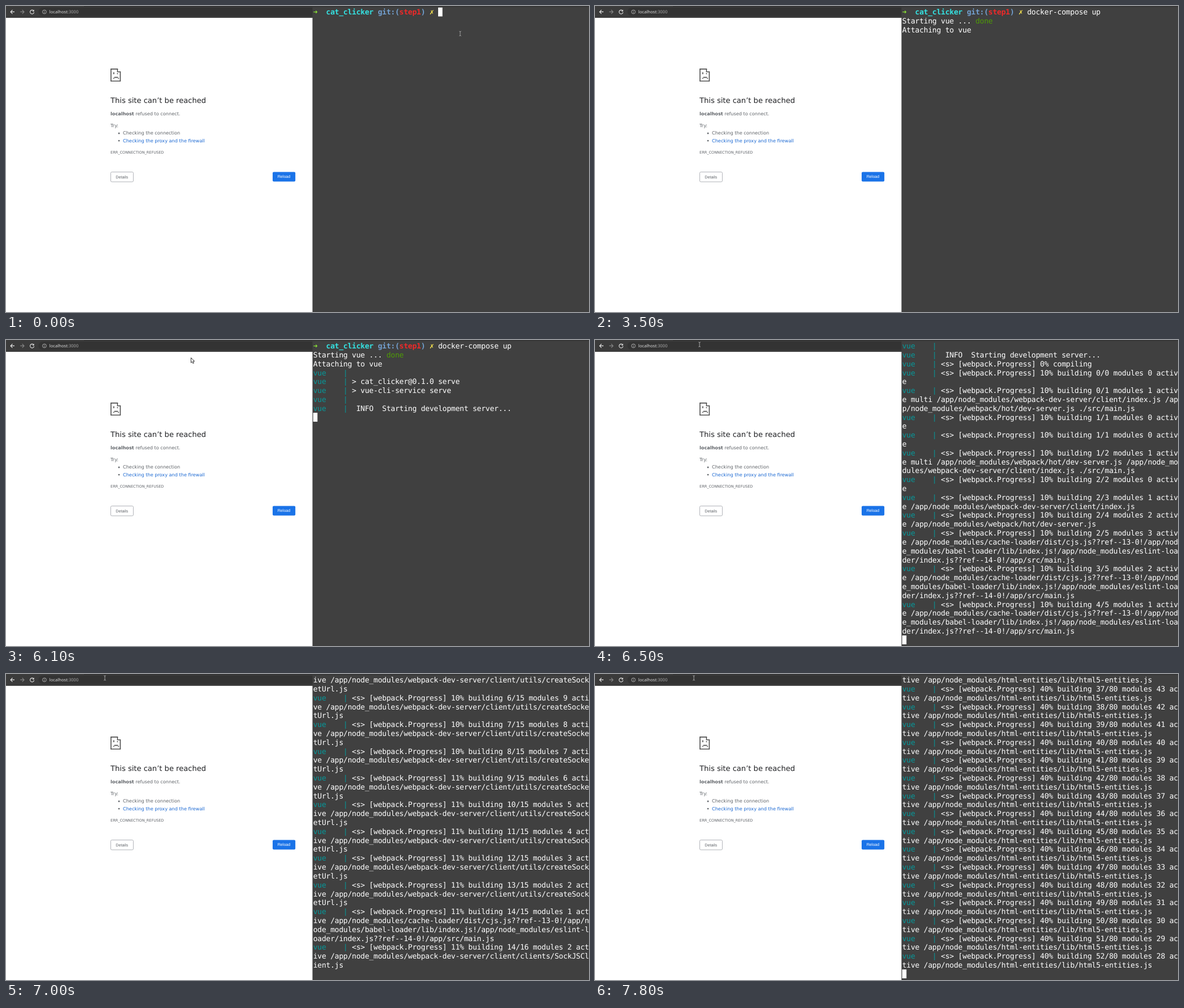
An HTML page for the animation above (8 s loop, 1032 by 543 pixels).

```html
<!DOCTYPE html>
<html lang="en">
<head>
<meta charset="utf-8">
<title>Starting a dev server</title>
<style>
  html, body { margin: 0; width: 100%; height: 100%; overflow: hidden; background: #fff; }
  svg { display: block; width: 1032px; height: 543px; }
  text { white-space: pre; text-rendering: geometricPrecision; }
  .page { font: 8.175px "DejaVu Sans", sans-serif; fill: #5f6368; }
  .page .title { font-size: 13.08px; fill: #202124; }
  .page .code { font-size: 6.54px; }
  .page .link { fill: #1967d2; }
  .page .button { font: 7.15px "Liberation Sans", Arial, sans-serif; text-anchor: middle; }
  .url { font: 7.6px "Noto Sans", "Open Sans", sans-serif; fill: #dedede; }
  .icon { fill: none; stroke: #e6e6e6; stroke-width: 1.1; }
  .term { font: 13.08px "DejaVu Sans Mono", monospace; letter-spacing: -.245px; fill: #fff; }
  .bold { font-weight: bold; }
  .arrow { fill: #8ae234; }
  .dir { fill: #34e2e2; }
  .git { fill: #729fcf; }
  .branch { fill: #ef2929; }
  .dirty { fill: #fce94f; }
  .done { fill: #4e9a06; }
  .service { fill: #06989a; }
</style>
</head>
<body>
<svg viewBox="0 0 1032 543">
  <rect width="543" height="543" fill="#fff"/>

  <!-- browser toolbar -->
  <rect width="543" height="21" fill="#3b3b3b"/>
  <rect x="138" width="405" height="1" fill="#2b2b2b"/>
  <path d="M543 2.8H65a7.5 7.5 0 0 0 0 15H543z" fill="#333"/>
  <g class="icon">
    <path d="M15 10.4H8.2M11.5 7 8.1 10.4l3.4 3.4"/>
    <path d="M25.2 10.4H32M28.7 7l3.4 3.4-3.4 3.4" stroke="#858585" style="stroke:#858585"/>
    <path d="M48.7 8.2a3.5 3.5 0 1 0 .9 2.9"/>
    <path d="M49.7 6.6v3.2h-3.2z" fill="#e6e6e6" stroke="none" style="stroke:none;fill:#e6e6e6"/>
    <g style="stroke:#c8c8c8;stroke-width:.8">
      <circle cx="68" cy="10.4" r="3.4"/>
      <path d="M68 9.9v2.4M68 8.3v.9"/>
    </g>
  </g>
  <text class="url" x="76.8" y="13.1">localhost<tspan fill="#a8a8a8">:3000</tspan></text>

  <!-- error page -->
  <g transform="translate(185 111) scale(1.65)" fill="#535353">
    <path d="M0 0H8V1H9V2H10V3H11V14H0ZM1 1V13H10V4H7V1ZM8 1V3H10V2H9V1Z" fill-rule="evenodd"/>
    <path d="M3 4h1v2H3zM7 5h1v1H7zM4 9h4v1H4zM3 10h1v1H3zM8 10h1v1H8z"/>
  </g>
  <g class="page">
    <text class="title" x="185" y="172.2">This site can’t be reached</text>
    <text x="185" y="194"><tspan class="bold">localhost</tspan> refused to connect.</text>
    <text x="185" y="215.3">Try:</text>
    <circle cx="200" cy="226" r="1.4"/>
    <text x="207" y="228.4">Checking the connection</text>
    <circle cx="200" cy="239.1" r="1.4"/>
    <text class="link" x="207" y="241.5">Checking the proxy and the firewall</text>
    <text class="code" x="185" y="262.2">ERR_CONNECTION_REFUSED</text>
    <rect x="185.4" y="294.6" width="40" height="17.4" rx="2" fill="#fff" stroke="#a6aaaf" stroke-width=".9"/>
    <text class="button" x="205.2" y="305.7">Details</text>
    <rect x="472" y="294.4" width="40.2" height="17" rx="2" fill="#1a73e8"/>
    <text class="button" x="492" y="305.3" fill="#fff" style="fill:#fff">Reload</text>
  </g>

  <!-- terminal -->
  <rect x="542.5" width="489.5" height="543" fill="#404040"/>
  <rect x="542.5" width="489.5" height="1.6" fill="#333"/>
  <g class="term" transform="translate(543.7 2.7)">
    <g id="rows"></g>
    <rect id="caret" width="7.63" height="15.8"/>
  </g>

  <g id="mouse">
    <g id="beam" fill="none">
      <path d="M-1.8-4.2Q0-4.2 0-3.2Q0-4.2 1.8-4.2M0-3.2V3.2M-1.8 4.2Q0 4.2 0 3.2Q0 4.2 1.8 4.2" stroke="#1c1c1c" stroke-width="1.9"/>
      <path d="M-1.8-4.2Q0-4.2 0-3.2Q0-4.2 1.8-4.2M0-3.2V3.2M-1.8 4.2Q0 4.2 0 3.2Q0 4.2 1.8 4.2" stroke="#e8e8e8" stroke-width=".8"/>
    </g>
    <path id="pointer" d="M.5.5V9.3L2.5 7.4 3.9 10.6 5.5 9.9 4.1 6.8H6.8Z" fill="#fff" stroke="#2b2b2b" stroke-width=".95" stroke-linejoin="round"/>
  </g>
</svg>

<script>
const LOOP = 8000, COLS = 64, VIEW = 33, CELL_W = 7.63, CELL_H = 15.805, BASE = 12.5;
const $ = id => document.getElementById(id);

// A line is a list of [column, text, class]; shown pairs a time with a line count.
const lines = [], shown = [[0, 0]];
const add = (...parts) => lines.push(parts);
const show = time => shown.push([time, lines.length]);

function service(text) {
  const all = 'vue    | ' + text;
  add([0, 'vue', 'service'], [7, '|', 'service'], [9, all.slice(9, COLS)]);
  for (let i = COLS; i < all.length; i += COLS) add([0, all.slice(i, i + COLS)]);
}

function progress(percent, built, total, path = '') {
  service(`<s> [webpack.Progress] ${percent}% building ${built}/${total} modules ` +
    `${total - built} active${path && ' ' + path}`);
}

const MODS = '/app/node_modules/';
const CLIENT = MODS + 'webpack-dev-server/client/';
const INDEX = CLIENT + 'index.js';
const HOT = MODS + 'webpack/hot/dev-server.js';
const MAIN = `${MODS}cache-loader/dist/cjs.js??ref--13-0!${MODS}babel-loader/lib/index.js!` +
  `${MODS}eslint-loader/index.js??ref--14-0!/app/src/main.js`;
const SOCKET = CLIENT + 'utils/createSocketUrl.js';
const ENTITIES = MODS + 'html-entities/lib/html5-entities.js';

const COMMAND = 'docker-compose up';
const PROMPT = [
  [0, '➜', 'bold arrow'], [3, 'cat_clicker', 'bold dir'], [15, 'git:(', 'bold git'],
  [20, 'step1', 'bold branch'], [25, ')', 'bold git'], [27, '✗', 'bold dirty']
];

add(...PROMPT, [29, COMMAND]);
show(2700);
add([0, 'Starting vue ...'], [17, 'done', 'done']);
show(3000);
add([0, 'Attaching to vue']);
show(3500);
['', '> cat_clicker@0.1.0 serve', '> vue-cli-service serve', ''].forEach(service);
show(4000);
service(' INFO  Starting development server...');
show(4300);
service('<s> [webpack.Progress] 0% compiling');
show(6300);
progress(10, 0, 0);
progress(10, 0, 1, `multi ${INDEX} ${HOT} ./src/main.js`);
progress(10, 1, 1);
progress(10, 1, 1);
progress(10, 1, 2, `multi ${HOT} ${INDEX} ./src/main.js`);
progress(10, 2, 2);
show(6400);
progress(10, 2, 3, INDEX);
progress(10, 2, 4, HOT);
for (let n = 2; n < 5; n++) progress(10, n, 5, MAIN);
show(6500);
for (let total = 6; total < 16; total++) {
  progress(10, 4, total, SOCKET);
  if (total === 13) show(6700);
}
for (let n = 5; n < 14; n++) progress(n < 9 ? 10 : 11, n, 15, SOCKET);
progress(11, 14, 15, MAIN);
progress(11, 14, 16, CLIENT + 'clients/SockJSClient.js');
show(7000);
for (let total = 17; total <= 80; total++) {
  progress(Math.floor(11 + (total - 16) * 29 / 64), 14, total, ENTITIES);
  if (total === 40) show(7400);
}
for (let n = 15; n <= 52; n++) {
  progress(40, n, 80, ENTITIES);
  if (n === 24) show(7600);
}
show(7800);

const TYPED = [[0, 0], [500, 1], [700, 2], [900, 3], [1000, 4], [1200, 5], [1300, 6], [1500, 8],
  [1600, 9], [1700, 10], [1900, 15], [2300, 16], [2400, 17]];
const CARET = [[0, 1], [3100, 0], [3700, 1], [4300, 0], [5000, 1], [5500, 0], [6100, 1],
  [6700, 0], [7400, 1]];
const MOUSE = [[0, 804, 49], [500], [3800, 804, 49], [5000, 810, 50], [5300, 760, 50],
  [5400, 690, 45], [5500, 610, 38], [5600, 530, 30], [5700, 484, 25], [5900, 443, 22],
  [6100, 327, 31], [6300, 190, 24], [6400, 108, 9], [6500, 185, 8], [6700, 175, 7]];

const at = (steps, time) => steps.findLast(step => step[0] <= time).slice(1);

const rows = Array.from({ length: VIEW }, (_, i) => {
  const row = document.createElementNS('http://www.w3.org/2000/svg', 'text');
  row.setAttribute('y', i * CELL_H + BASE);
  return $('rows').appendChild(row);
});

function fill(row, parts) {
  row.replaceChildren(...parts.map(([col, text, cls = '']) => {
    const span = document.createElementNS('http://www.w3.org/2000/svg', 'tspan');
    span.setAttribute('x', col * CELL_W);
    span.setAttribute('class', cls);
    span.textContent = text;
    return span;
  }));
}

const place = (el, x, y) => el.setAttribute('transform', `translate(${x} ${y})`);
const toggle = (el, on) => el.setAttribute('visibility', on ? 'visible' : 'hidden');

function drawTerminal(count, typed, done) {
  const view = lines.slice(Math.max(0, count - VIEW), count);
  if (!count) view.push([...PROMPT, [29, COMMAND.slice(0, typed)]]);
  if (count === 2 && !done) view[1] = view[1].slice(0, 1);
  rows.forEach((row, i) => fill(row, view[i] || []));
  place($('caret'), count ? 0 : (29 + typed) * CELL_W, Math.min(count, VIEW) * CELL_H);
}

function drawMouse(x, y) {
  const seen = x !== undefined, overPage = x < 543 && y > 20;
  if (seen) place($('mouse'), x, y);
  toggle($('beam'), seen && !overPage);
  toggle($('pointer'), seen && overPage);
}

let last = '';
function tick() {
  const time = performance.now() % LOOP;
  const [count] = at(shown, time), [typed] = at(TYPED, time);
  const done = time >= 3500, key = [count, typed, done].join();
  if (key !== last) drawTerminal(count, typed, done);
  last = key;
  toggle($('caret'), at(CARET, time)[0]);
  drawMouse(...at(MOUSE, time));
  requestAnimationFrame(tick);
}
tick();
</script>
</body>
</html>
```
